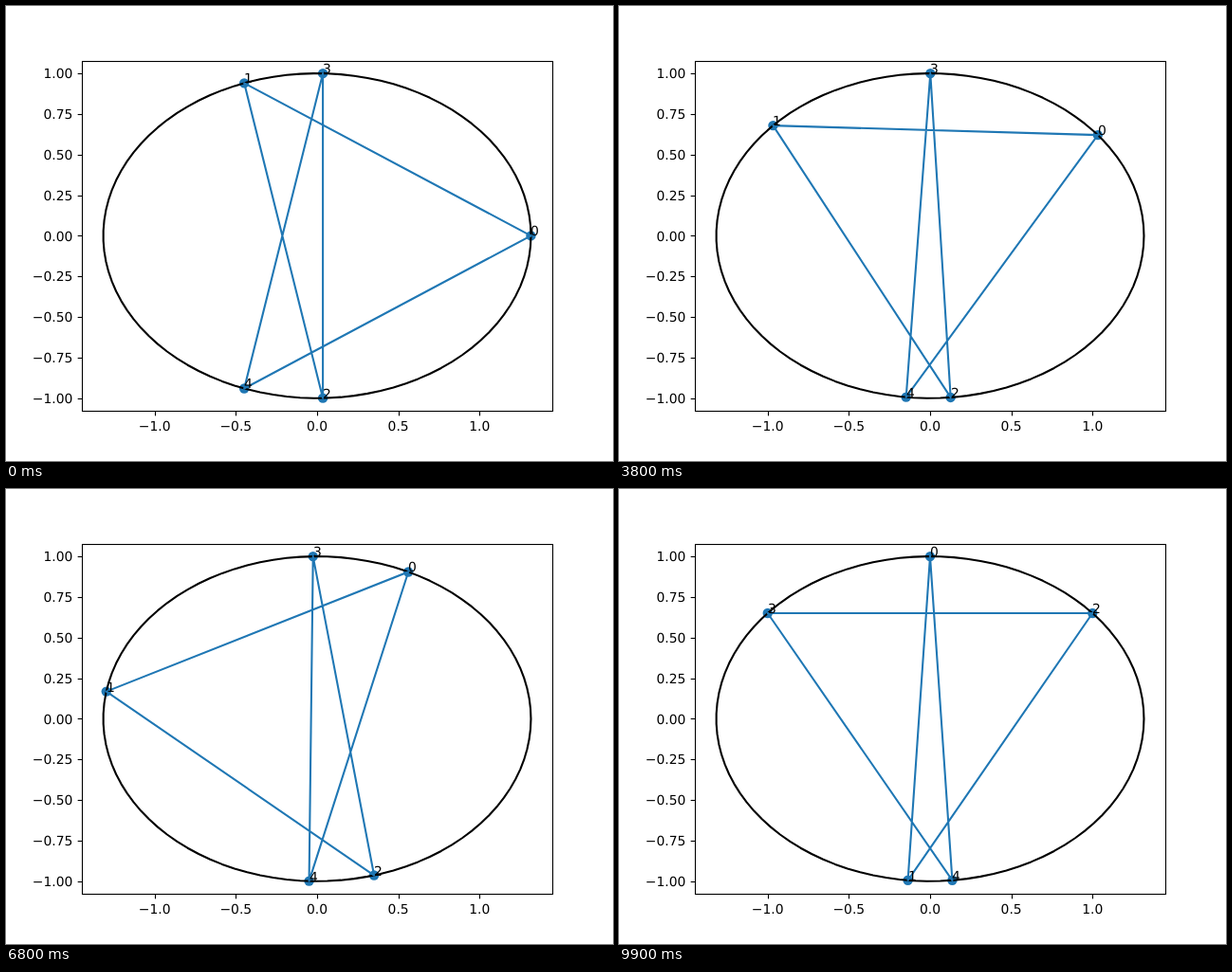
Animation of 640 by 480 pixels, one loop 10000 ms. Source, as an HTML page:

```html
<!DOCTYPE html>
<html lang="en">
<head>
<meta charset="utf-8">
<title>Equilateral star in an ellipse</title>
<style>
  html, body { margin: 0; width: 100%; height: 100%; overflow: hidden; background: #fff; }
  svg { display: block; }
  text { font: 13.89px "DejaVu Sans", sans-serif; text-rendering: geometricPrecision; }
</style>
</head>
<body>
<svg id="stage" width="640" height="480" viewBox="0 0 640 480"></svg>
<script>
const A = 1.316;                       // semi-axes are A and 1
const SCALE = 496 / (2.2 * A);
const STEPS = 100, STEP_MS = 100, SUBSTEPS = 8;
const BLUE = '#1f77b4';
const stage = document.getElementById('stage');

const px = x => 328 + SCALE * x;
const py = y => 242.4 - SCALE * y;
const point = t => [A * Math.cos(t), Math.sin(t)];
const pixel = t => { const [x, y] = point(t); return [px(x), py(y)]; };
const pathOf = angles => 'M' + angles.map(t => pixel(t).map(v => v.toFixed(3)).join(' ')).join('L');

function add(tag, attrs, text) {
  const el = document.createElementNS('http://www.w3.org/2000/svg', tag);
  for (const key in attrs) el.setAttribute(key, attrs[key]);
  if (text !== undefined) el.textContent = text;
  return stage.appendChild(el);
}

// Gaussian elimination with pivoting; each row ends with its right-hand side.
function solve(m) {
  const n = m.length;
  for (let c = 0; c < n; c++) {
    let p = c;
    for (let r = c + 1; r < n; r++) if (Math.abs(m[r][c]) > Math.abs(m[p][c])) p = r;
    [m[c], m[p]] = [m[p], m[c]];
    for (let r = 0; r < n; r++) {
      if (r === c) continue;
      const f = m[r][c] / m[c][c];
      for (let k = c; k <= n; k++) m[r][k] -= f * m[c][k];
    }
  }
  return m.map((row, i) => row[n] / row[i]);
}

// Newton steps: keep the first angle, make all five chords equally long.
function relax(angles, side2) {
  for (let pass = 0; pass < 8; pass++) {
    const rows = angles.map((t, i) => {
      const j = (i + 1) % 5, u = angles[j];
      const [x1, y1] = point(t), [x2, y2] = point(u);
      const dx = x1 - x2, dy = y1 - y2;
      const slope = [0, 0, 0, 0, 0];
      slope[i] = 2 * (-dx * A * Math.sin(t) + dy * Math.cos(t));
      slope[j] = 2 * (dx * A * Math.sin(u) - dy * Math.cos(u));
      return [...slope.slice(1), -1, side2 - dx * dx - dy * dy];
    });
    const d = solve(rows);
    for (let i = 1; i < 5; i++) angles[i] += d[i - 1];
    side2 += d[4];
  }
  return side2;
}

// Vertex 0 covers a quarter of the ellipse at constant speed.
function buildPoses() {
  const speed = t => Math.hypot(A * Math.sin(t), Math.cos(t));
  let quarter = 0;
  for (let i = 0; i < 1000; i++) quarter += speed((i + 0.5) * Math.PI / 2000) * Math.PI / 2000;
  const ds = quarter / ((STEPS - 1) * SUBSTEPS);
  const angles = [0, 1.918, -1.544, 1.544, -1.918];
  let side2 = relax(angles, 3.997);
  const poses = [angles.slice()];
  while (poses.length < STEPS) {
    for (let k = 0; k < SUBSTEPS; k++) {
      const mid = angles[0] + ds / 2 / speed(angles[0]);
      angles[0] += ds / speed(mid);
      side2 = relax(angles, side2);
    }
    poses.push(angles.slice());
  }
  return poses;
}

const poses = buildPoses();
const stroke = { fill: 'none', 'stroke-width': 2.083, 'stroke-linecap': 'square', 'stroke-linejoin': 'round' };

add('rect', { width: 640, height: 480, fill: '#fff' });
const dots = poses[0].map(() => add('circle', { r: 5.2, fill: BLUE }));
const turn = Array.from({ length: 100 }, (_, i) => i * 2 * Math.PI / 99);
add('path', { ...stroke, stroke: '#000', d: pathOf(turn) });
const star = add('path', { ...stroke, stroke: BLUE });

const thin = { fill: 'none', stroke: '#000', 'stroke-width': 1.11 };
const tickText = (v, digits) => (v < 0 ? '\u2212' : '') + Math.abs(v).toFixed(digits);
add('rect', { ...thin, x: 80.5, y: 58.5, width: 496, height: 369 });
for (let v = -1; v <= 1; v += 0.5) {
  add('path', { ...thin, d: `M${Math.round(px(v)) + 0.5} 427.5v4.86` });
  add('text', { x: px(v), y: 448, 'text-anchor': 'middle' }, tickText(v, 1));
}
for (let v = -1; v <= 1; v += 0.25) {
  add('path', { ...thin, d: `M80.5 ${Math.round(py(v)) + 0.5}h-4.86` });
  add('text', { x: 70.3, y: Math.round(py(v) + 5.1), 'text-anchor': 'end' }, tickText(v, 2));
}
const labels = poses[0].map((_, i) => add('text', {}, i));

function draw(ms) {
  const pose = poses[Math.floor(ms / STEP_MS) % STEPS];
  star.setAttribute('d', pathOf([...pose, pose[0]]));
  pose.forEach((t, i) => {
    const [x, y] = pixel(t);
    dots[i].setAttribute('cx', x);
    dots[i].setAttribute('cy', y);
    labels[i].setAttribute('x', Math.round(x));
    labels[i].setAttribute('y', Math.round(y));
  });
}

const start = performance.now();
function tick() {
  draw(performance.now() - start);
  requestAnimationFrame(tick);
}
tick();
</script>
</body>
</html>
```
